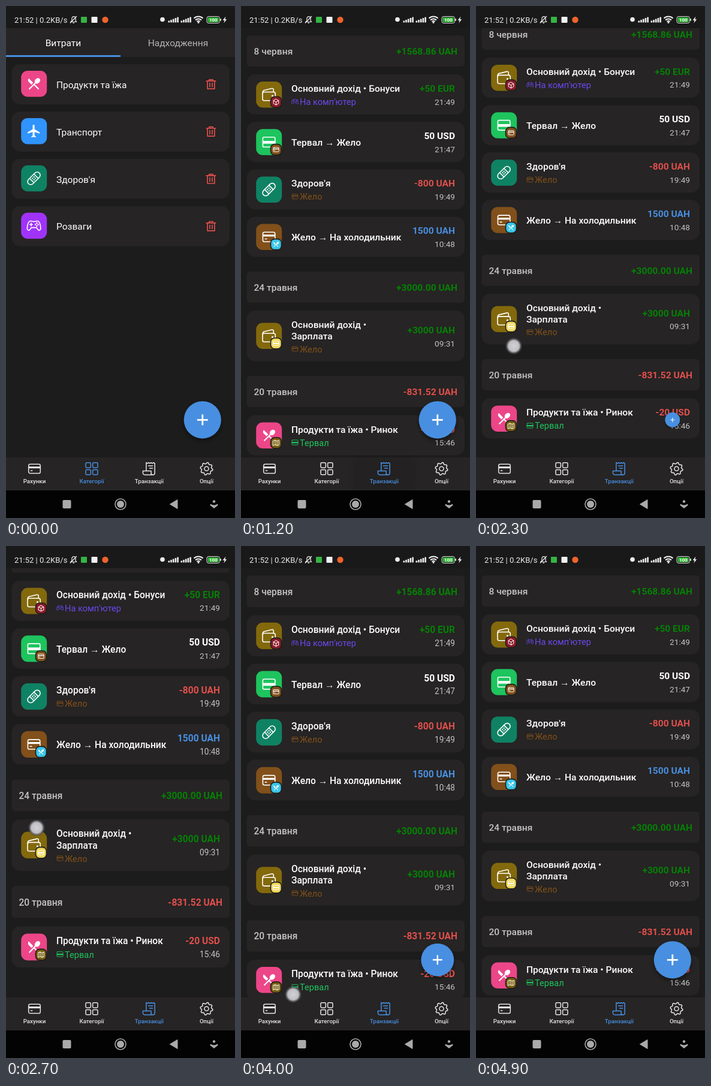
Animation of 382x854 px, one loop 5000 ms. Source, as an HTML page:

```html
<!DOCTYPE html>
<html lang="uk">
<head>
<meta charset="utf-8">
<title>Категорії та транзакції</title>
<style>
html, body { margin: 0; width: 100%; height: 100%; overflow: hidden; background: #1c1c1c; }
svg { display: block; position: absolute; left: 0; top: 0; }
text { font-family: Roboto, "Noto Sans", sans-serif; }
</style>
</head>
<body>
<svg id="stage" width="382" height="854" viewBox="0 0 382 854"></svg>
<script>
const BLUE = '#488fe1', RED = '#e04f4c', GREEN = '#058005', GREY = '#c4c4c4', CARD = '#262424', PAGE = '#1c1c1c';
const BROWN = '#82501a', LIME = '#1ec45e', VIOLET = '#6949ee', OLIVE = '#83690c';
const TOP = 37, BOTTOM = 753, VIEW = BOTTOM - TOP;
const DP = 382 / 392.73, BODY = 16 * DP, SMALL = 14 * DP;

const text = (x, y, s, fill = '#fff', size = BODY, weight = 400, anchor = 'start') =>
  `<text x="${x}" y="${y}" fill="${fill}" font-size="${size}" font-weight="${weight}" text-anchor="${anchor}">${s}</text>`;
const rect = (x, y, w, h, r, fill, extra = '') =>
  `<rect x="${x}" y="${y}" width="${w}" height="${h}" rx="${r}" fill="${fill}" ${extra}/>`;

function gearPath() {
  let d = '';
  for (let i = 0; i < 32; i++) {
    const a = (i - 1.5) / 32 * Math.PI * 2, r = i % 4 < 2 ? 8.2 : 10.2;
    d += `${i ? 'L' : 'M'}${(12 + r * Math.sin(a)).toFixed(2)} ${(12 - r * Math.cos(a)).toFixed(2)}`;
  }
  return d + 'Z';
}

// Icons live in a 24 x 24 box.
const line = d => `<path d="${d}"/>`;
const solid = d => `<path d="${d}" fill="currentColor" stroke="none"/>`;
const ICONS = {
  card: '<rect x="2.4" y="4.6" width="19.2" height="15" rx="2.6"/>' + solid('M2.4 8.4h19.2v3H2.4z') + line('M6 15.2h2.4'),
  bill: '<rect x="2.4" y="4.2" width="19.2" height="15.6" rx="2"/>' + solid('M2 10.2h20v4.3H2z'),
  grid: [[2.2, 2.2], [13.6, 2.2], [2.2, 13.6], [13.6, 13.6]].map(([x, y]) => `<rect x="${x}" y="${y}" width="8.2" height="8.2" rx="1.6"/>`).join(''),
  receipt: line('M7 15V2l2 1.3L11 2l2 1.3L15 2l2 1.3L19 2l2 1.3V19a3 3 0 0 1-3 3H5a3.4 3.4 0 0 1-3.4-3.6V15.6H15V19a3 3 0 0 0 3 3M10.5 7.2h7M12.5 11.2h5'),
  gear: line(gearPath()) + '<circle cx="12" cy="12" r="3.5"/>',
  food: solid('M8.1 13.34l2.83-2.83L3.91 3.5c-1.56 1.56-1.56 4.09 0 5.66l4.19 4.18zm6.78-1.81c1.53.71 3.68.21 5.27-1.38 1.91-1.91 2.28-4.65.81-6.12-1.46-1.46-4.2-1.1-6.12.81-1.59 1.59-2.09 3.74-1.38 5.27L3.7 19.87l1.41 1.41L12 14.41l6.88 6.88 1.41-1.41L13.41 13z'),
  plane: solid('M21 16v-2l-8-5V3.5a1.5 1.5 0 0 0-3 0V9l-8 5v2l8-2.5V19l-2 1.5V22l3.5-1 3.5 1v-1.5L13 19v-5.5z'),
  bandage: '<g transform="rotate(-45 12 12)"><rect x="0" y="7.2" width="24" height="9.6" rx="4.8"/>' + line('M7.2 7.2v9.6M16.8 7.2v9.6') +
    [[10.4, 10.4], [13.6, 10.4], [10.4, 13.6], [13.6, 13.6]].map(([x, y]) => `<circle cx="${x}" cy="${y}" r=".4"/>`).join('') + '</g>',
  pad: line('M7 4.6C9 4.6 9 5.6 12 5.6s3-1 5-1c3.6 0 5.2 6 5.6 11 .3 3.6-2.6 4.8-4.6 2.2l-2-2.8H8l-2 2.8c-2 2.6-4.9 1.4-4.6-2.2.4-5 2-11 5.6-11zM7.6 8v4.4M5.4 10.2h4.4') +
    [[16.5, 8], [16.5, 12.4], [14.3, 10.2], [18.7, 10.2]].map(([x, y]) => `<circle cx="${x}" cy="${y}" r=".5"/>`).join(''),
  trash: line('M2 5h20M8 4.6V2h8v2.6M4.4 5.4V22h15.2V5.4M9.4 9.5v8M14.6 9.5v8'),
  wallet: '<rect x="2" y="8" width="20" height="13.4" rx="2.6"/>' + line('M2.2 10V8.4c0-2 1-2.8 2.8-3.2l11.6-2.8c1.6-.3 2.6.5 2.6 2V8') + '<circle cx="17.6" cy="14" r=".8"/>',
  cube: line('M12 2l9 5v10l-9 5-9-5V7zM3 7l9 5 9-5M12 12v10'),
  map: line('M2 5l6.6-2.4 6.8 2.8L22 3v16l-6.6 2.4-6.8-2.8L2 21zM8.6 2.6v16M15.4 5.4v16')
};
const icon = (name, cx, cy, size, color, stroke = 1.6) =>
  `<g transform="translate(${cx - size / 2} ${cy - size / 2}) scale(${size / 24})" color="${color}" fill="none" stroke="currentColor" stroke-width="${stroke * 24 / size}" stroke-linejoin="round" stroke-linecap="round">${ICONS[name]}</g>`;

const tile = (y, name, bg) => rect(25.2, y, 43, 43.5, 11, bg) + icon(name, 46.6, y + 21.7, 25.5, '#fff', 1.6);
const badge = (y, name, bg, fg = '#fff') =>
  rect(49.5, y + 25.2, 18, 18, 6.5, bg, `stroke="${PAGE}" stroke-width="1.6"`) + icon(name, 58.5, y + 34.2, 11.5, fg, 1);

// Categories page
const categories = [
  ['Продукти та їжа', 'food', '#ec4688'], ['Транспорт', 'plane', '#3094fc'],
  ['Здоров\'я', 'bandage', '#0f8264'], ['Розваги', 'pad', '#a033fa']
].map(([name, ic, bg], i) => `<g transform="translate(0 ${97 + i * 78.9})">` + rect(9.5, 0, 363.5, 67, 14, CARD) +
  tile(11, ic, bg) + text(84, 39.8, name) + icon('trash', 342, 33.5, 18.5, RED, 1.7) + '</g>').join('');
const categoryPage = rect(0, TOP, 382, 48, 0, CARD) + text(95.5, 67.3, 'Витрати', '#fff', BODY, 400, 'middle') +
  text(287, 67.3, 'Надходження', '#b4b4b4', BODY, 400, 'middle') + rect(0, 82, 191, 3, 0, BLUE) + categories;

// Transactions page
const header = (y, day, sum, color) => ({ y, h: 52, body: rect(9.5, 0, 363.5, 52, 6, CARD) +
  text(21.5, 31.8, day, GREY, BODY, 500) + text(361, 31.8, sum, color, BODY, 700, 'end') });
function entry(y, o) {
  const tall = o.lines.length > 1, h = tall ? 84.5 : 67, ty = tall ? 20.5 : 12;
  let s = rect(9.5, 0, 363.5, h, 14, CARD) + tile(ty, o.icon, o.bg);
  if (o.badge) s += badge(ty, ...o.badge);
  const base = o.sub ? 29 : 40;
  o.lines.forEach((l, i) => s += text(84, base + i * 19, l, '#fff', BODY, 500));
  if (o.sub) {
    const [name, label, color] = o.sub, sy = tall ? 69.5 : 51;
    s += icon(name, 90, sy - 5.5, 12.5, color, .9) + text(98, sy, label, color, 15 * DP);
  }
  const ay = tall ? 38 : 29;
  s += text(357, ay, o.sum, o.color, BODY, 700, 'end') + text(357, ay + 21.5, o.time, GREY, SMALL, 400, 'end');
  return { y, h, body: s };
}
const rows = [
  header(49, '8 червня', '+1568.86 UAH', GREEN),
  entry(114, { lines: ['Основний дохід • Бонуси'], icon: 'wallet', bg: OLIVE, badge: ['cube', '#8c1b29'], sub: ['pad', 'На комп\'ютер', VIOLET], sum: '+50 EUR', color: GREEN, time: '21:49' }),
  entry(193.3, { lines: ['Тервал → Жело'], icon: 'bill', bg: LIME, badge: ['card', BROWN], sum: '50 USD', color: '#fff', time: '21:47' }),
  entry(272.4, { lines: ['Здоров\'я'], icon: 'bandage', bg: '#0f8264', sub: ['card', 'Жело', BROWN], sum: '-800 UAH', color: RED, time: '19:49' }),
  entry(351.4, { lines: ['Жело → На холодильник'], icon: 'card', bg: BROWN, badge: ['food', '#38c6e8'], sum: '1500 UAH', color: BLUE, time: '10:48' }),
  header(443, '24 травня', '+3000.00 UAH', GREEN),
  entry(508, { lines: ['Основний дохід •', 'Зарплата'], icon: 'wallet', bg: OLIVE, badge: ['bill', '#f0d75a'], sub: ['card', 'Жело', BROWN], sum: '+3000 UAH', color: GREEN, time: '09:31' }),
  header(617, '20 травня', '-831.52 UAH', RED),
  entry(682.5, { lines: ['Продукти та їжа • Ринок'], icon: 'food', bg: '#ec4688', badge: ['map', '#775e0c'], sub: ['bill', 'Тервал', LIME], sum: '-20 USD', color: RED, time: '15:46' })
];

// System bars
const bars = x => [3, 4.5, 6, 7.5, 9].map((h, i) => rect(x + i * 3.7, 27.5 - h, 2.6, h, .6, '#eee')).join('');
const status = rect(0, 0, 382, TOP, 0, '#191919') + text(14, 27.5, '21:52 | 0.2KB/s', '#eee', 13) +
  '<path d="M108 26.5h9.5l-1.4-2v-3.2c0-5-6.2-5-6.2 0v3.2zM111.5 28.3h2.5M107 28.5l11-11.5" fill="none" stroke="#eee" stroke-width="1.2"/>' +
  rect(125, 18, 10, 10, 1, '#35b544') + rect(142.5, 18, 10, 10, 1, '#f1f1f1') + '<circle cx="165.5" cy="23" r="5.2" fill="#ef632c"/>' +
  '<circle cx="261" cy="22.5" r="3.8" fill="#eee"/>' + bars(270.5) + bars(291.5) +
  '<g fill="none" stroke="#eee" stroke-width="1.9"><path d="M313.5 20.5a11 11 0 0 1 15 0M316 23.5a7.2 7.2 0 0 1 10 0M318.4 26a3.8 3.8 0 0 1 5.2 0"/></g><circle cx="321" cy="27.6" r="1.5" fill="#eee"/>' +
  rect(335, 17.5, 21.5, 11, 3, '#101010', 'stroke="#eee" stroke-width="1"') + rect(336.5, 19, 18.5, 8, 1.5, '#2fb634') + rect(357.3, 21, 1.6, 4, .8, '#eee') +
  text(345.8, 26, '100', '#fff', 8, 700, 'middle') + '<path d="M366.5 17.5l-5 6.3h3l-1.2 4.7 5-6.3h-3z" fill="#eee"/>';
const keys = rect(0, 808, 382, 46, 0, '#030303') + rect(94.5, 824, 14, 14, 2, '#aaa') +
  '<circle cx="191" cy="831" r="9" fill="none" stroke="#aaa" stroke-width="1.6"/><circle cx="191" cy="831" r="6" fill="#aaa"/>' +
  '<path d="M286 823.5v15l-12.5-7.5z" fill="#aaa" stroke="#aaa" stroke-linejoin="round"/>' +
  '<circle cx="347" cy="826.5" r="2.2" fill="#aaa"/><path d="M341 830.5q6 4 12 0l.6 2.2L347 838l-6.6-5.3z" fill="#aaa"/>';
const TABS = [['card', 'Рахунки', 47.5], ['grid', 'Категорії', 143], ['receipt', 'Транзакції', 239], ['gear', 'Опції', 334.5]];
const nav = active => TABS.map(([ic, name, x], i) => {
  const c = i === active ? BLUE : '#e6e6e6';
  return icon(ic, x, 771.8, 24.5, c, 1.5) + text(x, 795.8, name, c, 10 * DP, 500, 'middle');
}).join('');

const stage = document.getElementById('stage');
stage.innerHTML = `<defs><clipPath id="view"><rect x="0" y="${TOP}" width="382" height="${VIEW}"/></clipPath>
<filter id="soft" x="-30%" y="-30%" width="160%" height="160%"><feGaussianBlur stdDeviation="3"/></filter>
<radialGradient id="touch"><stop offset="0" stop-color="#d2d2d6"/><stop offset=".6" stop-color="#c0c0c4"/><stop offset=".72" stop-color="#8a8a8e"/><stop offset=".84" stop-color="#55555a" stop-opacity=".7"/><stop offset="1" stop-color="#444" stop-opacity="0"/></radialGradient></defs>` +
  rect(0, 0, 382, 854, 0, PAGE) + `<g id="cats">${categoryPage}</g>` +
  `<g id="list" clip-path="url(#view)">${rows.map(r => `<g class="row">${r.body}</g>`).join('')}</g>` +
  `<g id="fab"><circle cy="4" r="31" fill="#000" opacity=".4" filter="url(#soft)"/><circle r="${32 * DP}" fill="${BLUE}"/><path d="M-9 0H9M0-9V9" stroke="#fff" stroke-width="2.8"/></g>` +
  rect(0, BOTTOM, 382, 55, 0, CARD) + rect(187, BOTTOM, 106, 55, 12, '#000', 'id="ripple" filter="url(#soft)"') +
  `<g id="navA">${nav(1)}</g><g id="navB">${nav(2)}</g>` + status + keys +
  '<circle id="dot" r="14.5" fill="url(#touch)"/>';

const el = id => document.getElementById(id);
const rowEls = [...document.querySelectorAll('.row')];
const show = (id, on) => el(id).setAttribute('display', on ? 'inline' : 'none');

// Each track is a list of [time, value].
const TRACKS = {
  ripple: [[600, 0], [800, .24], [1000, .2], [1300, 0]],
  scroll: [[2050, 0], [2450, 45], [3620, 45], [3820, 0]],
  pullUp: [[2450, 0], [2700, 11.3], [3000, 11.3], [3500, 6.8], [3620, 0]],
  pullDown: [[3820, 0], [4000, 7.5], [4150, 8.2], [4250, 5], [4450, 0]],
  fab: [[2150, 1], [2400, 0], [3780, 0], [4000, .88], [4100, 1]],
  dotX: [[2000, 72], [2700, 51], [3500, 43], [4000, 87], [4150, 92]],
  dotY: [[2000, 640], [2700, 470], [3000, 468], [3500, 562], [4000, 748], [4150, 760]]
};
function at(name, t) {
  const k = TRACKS[name];
  if (t <= k[0][0]) return k[0][1];
  for (let i = 1; i < k.length; i++) {
    const [t0, a] = k[i - 1], [t1, b] = k[i];
    if (t <= t1) return a + (b - a) * (t - t0) / (t1 - t0);
  }
  return k[k.length - 1][1];
}
const ease = u => 1 - (1 - u) * (1 - u);

function draw(t) {
  const listOn = t >= 900;
  show('cats', !listOn); show('navA', !listOn);
  show('list', listOn); show('navB', listOn);
  el('ripple').setAttribute('opacity', at('ripple', t));

  // Overscroll stretches the list away from the edge being pulled.
  const scroll = at('scroll', t), up = at('pullUp', t), down = at('pullDown', t);
  const place = y => {
    y -= scroll;
    const u = Math.min(1, Math.max(0, (y - TOP) / VIEW));
    return y - up * ease(1 - u) + down * ease(u);
  };
  rows.forEach((r, i) => {
    const a = place(r.y), b = place(r.y + r.h);
    rowEls[i].setAttribute('transform', `translate(0 ${a}) scale(1 ${(b - a) / r.h})`);
  });

  el('fab').setAttribute('transform', `translate(327.8 690.3) scale(${at('fab', t)})`);
  show('dot', t >= 2000 && t < 4200);
  el('dot').setAttribute('transform', `translate(${at('dotX', t)} ${at('dotY', t)})`);
}

function tick(now) {
  draw(Math.floor(now % 5000 / 100) * 100);
  requestAnimationFrame(tick);
}
draw(0);
requestAnimationFrame(tick);
</script>
</body>
</html>
```
